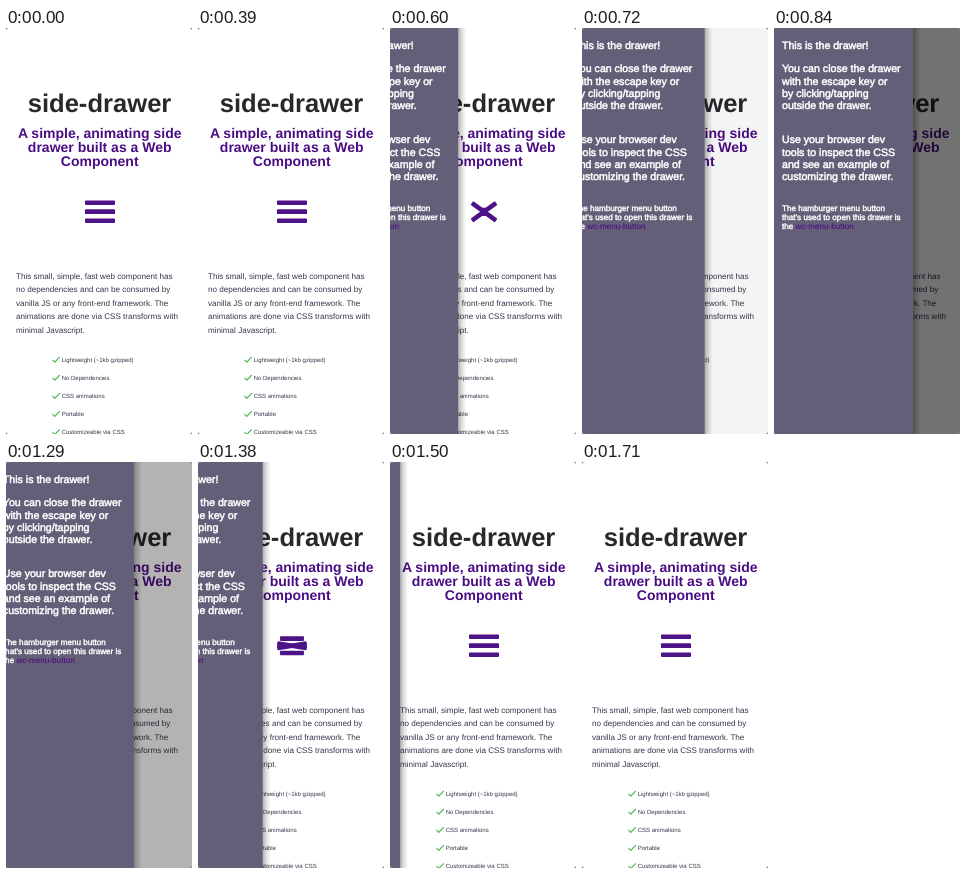
Recreate the animation shown at these times as an HTML page. Size 186 by 406 pixels, loop 1920 ms.

```html
<!DOCTYPE html>
<html lang="en">
<head>
<meta charset="utf-8">
<title>side-drawer</title>
<style>
  html, body { margin: 0; width: 100%; height: 100%; overflow: hidden; background: #777; }
  svg { display: block; width: 186px; height: 406px; border-radius: 3px; background: #fff;
        font-family: "Liberation Sans", Arial, sans-serif; text-rendering: geometricPrecision; }
  .title { font: bold 25.6px "Liberation Sans", sans-serif; fill: #29282d; text-anchor: middle; }
  .tagline { font: bold 14px "Liberation Sans", sans-serif; fill: #4b0d82; text-anchor: middle; }
  .intro { font-size: 8.1px; fill: #36354a; }
  .features { font-size: 6px; fill: #36354a; }
  .ticks { fill: none; stroke: #4db85a; stroke-width: 1.2; }
  .bars { fill: #4e1287; }
  .drawer text { font-size: 10.6px; fill: #fff; stroke: #fff; stroke-width: .5px; }
  .drawer .note, .drawer .note text { font-size: 8.15px; stroke-width: .4px; }
  .drawer .link { fill: #4b0082; stroke: none; }
</style>
</head>
<body>
<svg viewBox="0 0 186 406">
  <defs>
    <linearGradient id="shade">
      <stop offset="0" stop-color="#000" stop-opacity=".3"/>
      <stop offset=".45" stop-color="#000" stop-opacity=".13"/>
      <stop offset="1" stop-color="#000" stop-opacity="0"/>
    </linearGradient>
  </defs>
  <text class="title" x="93.5" y="84">side-drawer</text>
  <g class="tagline" id="tagline"></g>
  <g class="bars" id="bars"></g>
  <g class="intro" id="intro"></g>
  <g class="features" id="features"></g>
  <path class="ticks" id="ticks"/>
  <rect id="overlay" width="186" height="406"/>
  <g class="drawer" id="drawer">
    <rect width="141" height="406" fill="#645f78"/>
    <rect x="141" width="8" height="406" fill="url(#shade)"/>
    <text x="10" y="21">This is the drawer!</text>
    <g id="closing"></g>
    <g id="styling"></g>
    <g class="note" id="note"></g>
    <text class="note" x="10" y="200.8">the <tspan class="link">wc-menu-button</tspan></text>
  </g>
</svg>
<script>
const LOOP = 1920, STEP = 30, TRAVEL = 149;
const $ = id => document.getElementById(id);

function addSvg(parent, name, attributes, content = '') {
  const node = document.createElementNS('http://www.w3.org/2000/svg', name);
  for (const key in attributes) node.setAttribute(key, attributes[key]);
  node.textContent = content;
  return parent.appendChild(node);
}

function addLines(id, x, y, leading, lines) {
  lines.forEach((line, i) => addSvg($(id), 'text', { x, y: y + i * leading }, line));
}

addLines('tagline', 93.7, 109.5, 14, ['A simple, animating side', 'drawer built as a Web', 'Component']);
addLines('intro', 10, 250.8, 13.5, [
  'This small, simple, fast web component has',
  'no dependencies and can be consumed by',
  'vanilla JS or any front-end framework. The',
  'animations are done via CSS transforms with',
  'minimal Javascript.'
]);
const features = ['Lightweight (~1kb gzipped)', 'No Dependencies', 'CSS animations', 'Portable', 'Customizeable via CSS'];
addLines('features', 55.7, 333.8, 18.1, features);
$('ticks').setAttribute('d', features.map((_, i) => `M46.5 ${331.8 + i * 18.1}l2.3 2.3 5-5.2`).join(''));
addLines('closing', 10, 44.3, 12.2, ['You can close the drawer', 'with the escape key or', 'by clicking/tapping', 'outside the drawer.']);
addLines('styling', 10, 115.3, 12.2, ['Use your browser dev', 'tools to inspect the CSS', 'and see an example of', 'customizing the drawer.']);
addLines('note', 10, 182.8, 9, ['The hamburger menu button', "that's used to open this drawer is"]);

// Two crossing middle bars between a top and a bottom bar that collapse.
const bars = [-9, 0, 0, 9].map(() => addSvg($('bars'), 'rect', { height: 4.6, rx: 0.8 }));

// CSS-style cubic Bézier easing, solved by bisection.
function bezier(x1, y1, x2, y2) {
  const at = (a, b, s) => 3 * a * s * (1 - s) ** 2 + 3 * b * s * s * (1 - s) + s ** 3;
  return p => {
    let low = 0, high = 1;
    for (let i = 0; i < 24; i++) {
      const mid = (low + high) / 2;
      if (at(x1, x2, mid) < p) low = mid; else high = mid;
    }
    return at(y1, y2, (low + high) / 2);
  };
}
const slide = bezier(0.4, 0, 0.2, 1);
const easeInOut = bezier(0.42, 0, 0.58, 1);
const linear = p => p;

function ramp(t, start, duration, ease) {
  return ease(Math.min(1, Math.max(0, (t - start) / duration)));
}

function drawBars(open) {
  [-9, 0, 0, 9].forEach((offset, i) => {
    const outer = offset !== 0;
    const width = outer ? 30 * (1 - open) : 30;
    const angle = outer ? 0 : (i === 1 ? 45 : -45) * open;
    bars[i].setAttribute('x', 94 - width / 2);
    bars[i].setAttribute('y', 181.5 + offset * (1 - open));
    bars[i].setAttribute('width', width);
    bars[i].setAttribute('transform', `rotate(${angle} 94 183.8)`);
  });
}

function draw() {
  const t = Math.floor(performance.now() % LOOP / STEP) * STEP;
  const drawer = ramp(t, 428, 485, slide) - ramp(t, 1208, 485, slide);
  const dim = ramp(t, 710, 165, linear) - ramp(t, 1195, 165, linear);
  drawBars(ramp(t, 428, 250, easeInOut) - ramp(t, 1208, 250, easeInOut));
  $('drawer').setAttribute('transform', `translate(${TRAVEL * (drawer - 1)})`);
  $('overlay').setAttribute('opacity', 0.7 * dim);
  requestAnimationFrame(draw);
}
draw();
</script>
</body>
</html>
```
